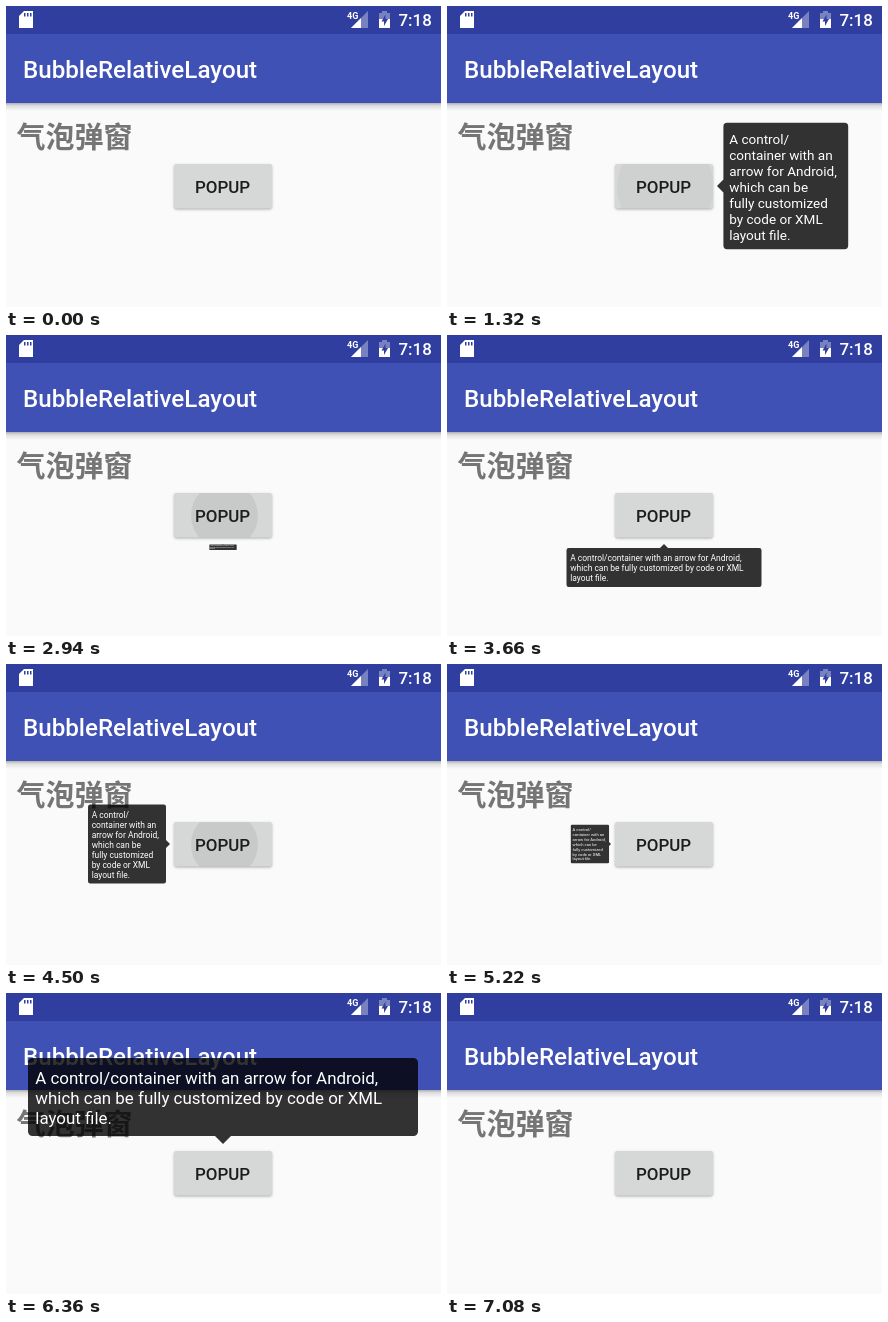
Animation of 435 by 301 pixels, one loop 8220 ms. Source, as an HTML page with a canvas:

```html
<!DOCTYPE html>
<html lang="en">
<head>
<meta charset="utf-8">
<title>Bubble popup</title>
<style>
html, body { margin: 0; width: 435px; height: 301px; overflow: hidden; background: #fafafa; }
canvas { display: block; }
</style>
</head>
<body>
<canvas id="stage" width="435" height="301"></canvas>
<script>
const ctx = document.getElementById('stage').getContext('2d');
const LOOP = 8220, TICK = 60, STEP = 0.5;
const SANS = 'Roboto, sans-serif';

const WIDE = ['A control/container with an arrow for Android,',
  'which can be fully customized by code or XML', 'layout file.'];
const NARROW = ['A control/', 'container with an', 'arrow for Android,', 'which can be',
  'fully customized', 'by code or XML', 'layout file.'];

// tip: arrow point on stage; dir: from the tip towards the body; box: body relative to the tip
const popups = [
  { show: 1260, from: 0.3, hide: 1980, to: 0.735, tip: [270, 180], dir: [1, 0], box: [8, -79, 156, 158], lines: NARROW },
  { show: 2940, from: 0.07, hide: 3660, to: 0.5, tip: [217, 209], dir: [0, 1], box: [-195, 8, 390, 78], lines: WIDE },
  { show: 4500, from: 0.5, hide: 5220, to: 0.245, tip: [164, 180], dir: [-1, 0], box: [-164, -79, 156, 158], lines: NARROW },
  { show: 6000, from: 0.2, hide: 7020, to: 0.5, tip: [217, 151], dir: [0, -1], box: [-195, -86, 390, 78], lines: WIDE }
];

function rect(x, y, w, h, color) {
  ctx.fillStyle = color;
  ctx.fillRect(x, y, w, h);
}

function poly(points, color) {
  ctx.beginPath();
  points.forEach(([x, y]) => ctx.lineTo(x, y));
  ctx.closePath();
  ctx.fillStyle = color;
  ctx.fill();
}

function text(str, x, y, font, color) {
  ctx.font = font;
  ctx.fillStyle = color;
  ctx.fillText(str, x, y);
}

function drawStatusBar() {
  rect(0, 0, 435, 28, '#303f9f');

  // memory card
  poly([[18, 5], [27, 5], [27, 22], [13, 22], [13, 10]], '#fff');
  for (const x of [18, 21, 24]) rect(x, 7, 1.5, 3.5, '#303f9f');

  // signal
  poly([[345, 22], [362, 5], [362, 22]], 'rgba(255,255,255,.35)');
  poly([[345, 22], [355, 12], [355, 22]], '#fff');
  rect(340, 4, 13, 10, '#303f9f');
  text('4G', 341, 13, `700 9px ${SANS}`, '#fff');

  // battery
  rect(376, 5, 5, 2, 'rgba(255,255,255,.35)');
  rect(373, 7, 11, 6, 'rgba(255,255,255,.35)');
  rect(373, 13, 11, 9, '#fff');
  poly([[379.5, 8.5], [375.5, 15.5], [378, 15.5], [378, 20], [382, 13], [379.5, 13]], '#303f9f');

  text('7:18', 392.5, 20, `500 16.9px ${SANS}`, '#fff');
}

function drawToolbar() {
  const shade = ctx.createLinearGradient(0, 97, 0, 105);
  shade.addColorStop(0, 'rgba(0,0,0,.3)');
  shade.addColorStop(0.35, 'rgba(0,0,0,.11)');
  shade.addColorStop(1, 'rgba(0,0,0,0)');
  rect(0, 97, 435, 8, shade);
  rect(0, 28, 435, 69, '#3f51b5');
  text('BubbleRelativeLayout', 17, 72, `500 24.17px ${SANS}`, '#fff');
}

function drawButton(ripple) {
  ctx.save();
  ctx.beginPath();
  ctx.roundRect(168, 158, 98, 44.5, 2.4);
  ctx.shadowColor = 'rgba(0,0,0,.3)';
  ctx.shadowBlur = 2.5;
  ctx.shadowOffsetY = 1;
  ctx.fillStyle = '#d6d7d7';
  ctx.fill();
  ctx.shadowColor = 'transparent';
  if (ripple < 1) {
    ctx.clip();
    ctx.beginPath();
    ctx.arc(218.5, 180.5, 33.5 + 30 * ripple, 0, 2 * Math.PI);
    ctx.fillStyle = `rgba(0,0,0,${0.065 * (1 - ripple)})`;
    ctx.fill();
  }
  ctx.restore();
  text('POPUP', 189, 187, `500 16.92px ${SANS}`, '#1c1c1c');
}

function drawPopup({ tip, dir: [dx, dy], box, lines }, scale) {
  const [x, y, w, h] = box, size = 8;
  ctx.save();
  ctx.translate(...tip);
  ctx.scale(scale, scale);
  ctx.beginPath();
  ctx.roundRect(x, y, w, h, 4.5);
  ctx.moveTo(0, 0);
  ctx.lineTo(size * (dx - dy), size * (dy + dx));
  ctx.lineTo(size * (dx + dy), size * (dy - dx));
  ctx.closePath();
  ctx.fillStyle = 'rgba(0,0,0,.8)';
  ctx.fill();
  lines.forEach((line, i) => text(line, x + 7.3, y + 26 + 20 * i, `16.92px ${SANS}`, '#fff'));
  ctx.restore();
}

function scaleAt(p, t) {
  if (t < p.show) return 0;
  if (t < p.hide) return Math.min(1, p.from + STEP * (t - p.show) / TICK);
  return Math.max(0, p.to - STEP * (t - p.hide) / TICK);
}

function draw(t) {
  rect(0, 0, 435, 301, '#fafafa');
  drawToolbar();
  drawStatusBar();
  text('气泡弹窗', 10.5, 142, '700 29px "Noto Sans CJK SC", "Noto Sans CJK", sans-serif', '#757575');

  const pressed = popups.filter(p => p.show <= t).pop();
  drawButton(pressed ? Math.min(1, (t - pressed.show) / (2 * TICK)) : 1);

  for (const p of popups) {
    const scale = scaleAt(p, t);
    if (scale > 0) drawPopup(p, scale);
  }
}

function frame() {
  const t = performance.now() % LOOP;
  draw(Math.floor(t / TICK) * TICK);
  requestAnimationFrame(frame);
}
frame();
</script>
</body>
</html>
```
